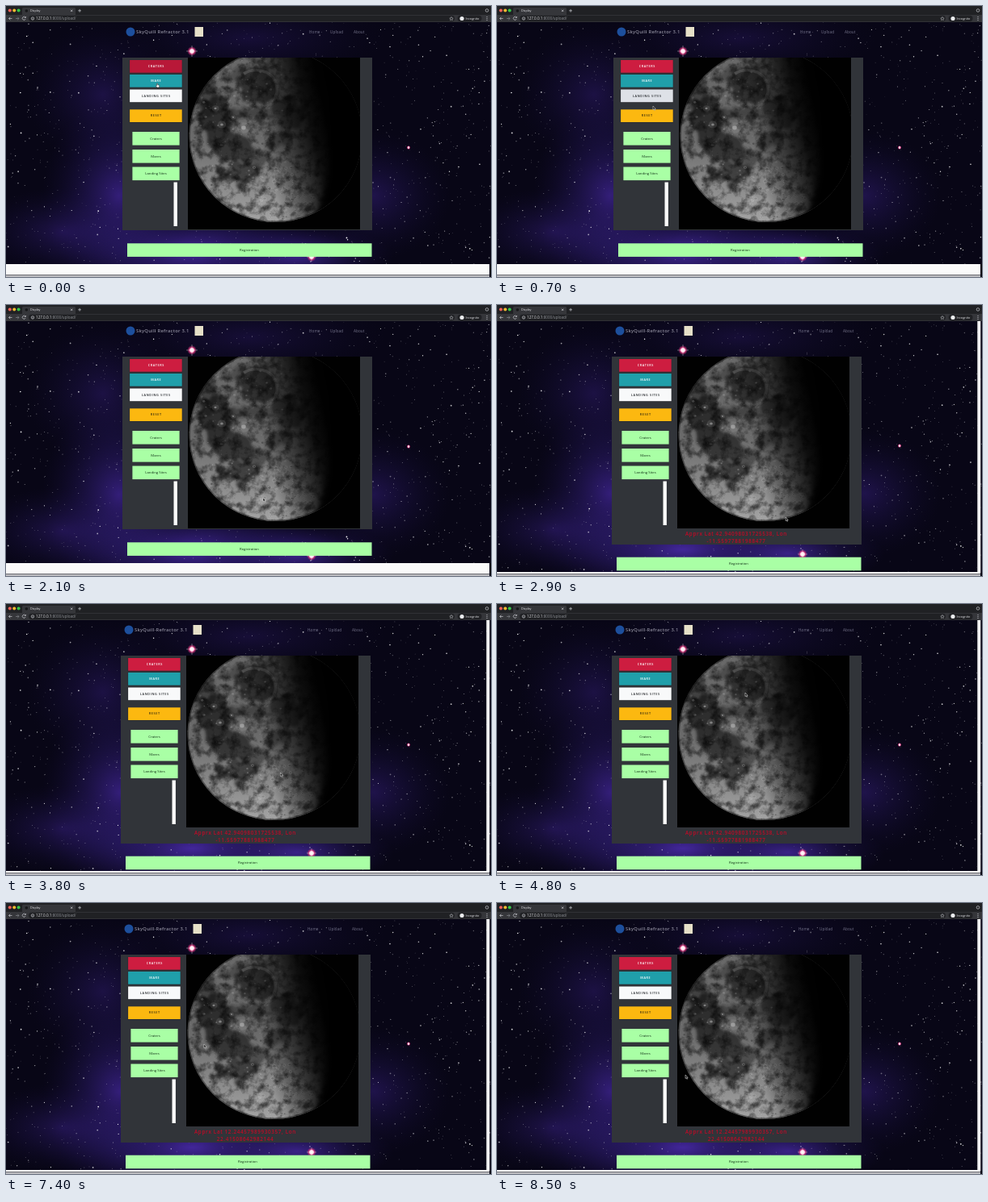
Recreate the animation shown at these times as an HTML page. Size 600 by 336 pixels, loop 8.6 s.

```html
<!DOCTYPE html>
<html lang="en">
<head>
<meta charset="utf-8">
<title>Display</title>
<style>
  html, body { margin: 0; width: 100%; height: 100%; overflow: hidden; background: #0a0720; }
  svg { display: block; width: 100%; height: 100%; }
  text { font-family: "Open Sans", "Noto Sans", sans-serif; }
  .mid { text-anchor: middle; }
  .btn { font-size: 3.8px; font-weight: 600; letter-spacing: .62px; }
  .link { font-size: 4.3px; fill: #123018; }
  .nav { font-size: 4.7px; fill: #74738a; letter-spacing: .05px; }
  .brand { font-size: 5.8px; font-weight: 600; letter-spacing: .25px; fill: #8d8c9c; }
  .ui { font-size: 4.3px; fill: #e4e5e8; }
  .coords { font-size: 6.3px; font-weight: 600; letter-spacing: .66px; fill: #c00a26; }
</style>
</head>
<body>
<svg viewBox="0 0 600 336" preserveAspectRatio="none">
  <defs>
    <radialGradient id="violet">
      <stop offset="0" stop-color="#4c2cb0" stop-opacity=".85"/>
      <stop offset=".5" stop-color="#33207c" stop-opacity=".45"/>
      <stop offset="1" stop-color="#1b1048" stop-opacity="0"/>
    </radialGradient>
    <radialGradient id="pink">
      <stop offset="0" stop-color="#fff"/>
      <stop offset=".4" stop-color="#ffd8ea"/>
      <stop offset=".6" stop-color="#e0357c" stop-opacity=".8"/>
      <stop offset="1" stop-color="#a0206a" stop-opacity="0"/>
    </radialGradient>
    <linearGradient id="ground" x2="0" y2="1">
      <stop offset="0" stop-color="#686868"/>
      <stop offset=".5" stop-color="#6a6a6a"/>
      <stop offset=".75" stop-color="#868686"/>
      <stop offset="1" stop-color="#a4a4a4"/>
    </linearGradient>
    <linearGradient id="night" gradientUnits="userSpaceOnUse" x1="318" y1="165" x2="398" y2="147">
      <stop offset="0" stop-color="#010101" stop-opacity="0"/>
      <stop offset=".4" stop-color="#010101" stop-opacity=".5"/>
      <stop offset=".75" stop-color="#010101" stop-opacity=".88"/>
      <stop offset="1" stop-color="#010101"/>
    </linearGradient>
    <filter id="soft" x="-30%" y="-30%" width="160%" height="160%"><feGaussianBlur stdDeviation="4"/></filter>
    <filter id="ragged" x="-20%" y="-20%" width="140%" height="140%">
      <feTurbulence type="fractalNoise" baseFrequency=".06" numOctaves="4" seed="5"/>
      <feDisplacementMap in="SourceGraphic" scale="26" xChannelSelector="R" yChannelSelector="G"/>
      <feGaussianBlur stdDeviation="1.6"/>
    </filter>
    <filter id="rough" x="0" y="0" width="100%" height="100%">
      <feTurbulence type="fractalNoise" baseFrequency=".09" numOctaves="5" seed="11"/>
      <feColorMatrix values="0 0 0 0 0  0 0 0 0 0  0 0 0 0 0  2.6 0 0 0 -1.1"/>
    </filter>
    <clipPath id="frame"><rect x="225" y="64" width="213" height="213"/></clipPath>
    <clipPath id="disc"><circle cx="333.5" cy="161" r="107"/></clipPath>
  </defs>

  <rect width="600" height="336" fill="#080616"/>
  <g id="sky">
    <g fill="url(#violet)">
      <ellipse cx="230" cy="305" rx="190" ry="60"/>
      <ellipse cx="360" cy="310" rx="120" ry="40" opacity=".8"/>
      <ellipse cx="140" cy="235" rx="95" ry="120" opacity=".75"/>
      <ellipse cx="70" cy="280" rx="110" ry="55" opacity=".4"/>
      <ellipse cx="120" cy="110" rx="95" ry="90" opacity=".35"/>
      <ellipse cx="455" cy="235" rx="95" ry="80" opacity=".4"/>
      <ellipse cx="300" cy="40" rx="170" ry="50" opacity=".25"/>
    </g>
    <g id="stars" fill="#fff"></g>
    <g id="flares" fill="url(#pink)"></g>
  </g>

  <g id="page">
    <circle cx="154" cy="32" r="5.5" fill="#1d4f9c"/>
    <text class="brand" x="161" y="34">SkyQuill Refractor 3.1</text>
    <rect x="233.5" y="26" width="10.5" height="12" fill="#e6e0c8"/>
    <text class="nav" x="375" y="34">Home</text>
    <text class="nav" x="401" y="34">Upload</text>
    <text class="nav" x="430" y="34">About</text>
    <rect id="panel" x="144" y="64" width="309" height="214" fill="#313439"/>
    <g id="buttons"></g>
    <rect x="207.5" y="218.5" width="4.4" height="54.5" fill="#fafafa"/>
    <g clip-path="url(#frame)">
      <rect x="225" y="64" width="213" height="213" fill="#010101"/>
      <g clip-path="url(#disc)">
        <rect x="225" y="54" width="213" height="215" fill="url(#ground)"/>
        <g id="maria" filter="url(#ragged)" fill="#1c1c1c"></g>
        <g id="grain"></g>
        <rect x="225" y="54" width="213" height="215" filter="url(#rough)" opacity=".6"/>
        <g id="rays" fill="#c4c4c4"></g>
        <circle cx="333.5" cy="161" r="107" fill="none" stroke="#010101" stroke-width="3" opacity=".4"/>
        <rect x="225" y="54" width="213" height="225" fill="url(#night)"/>
        <path d="M384 50C398 90 402 130 402 165C402 205 392 245 374 282H450V50Z" fill="#010101" filter="url(#soft)"/>
      </g>
    </g>
    <g id="result" class="mid">
      <text class="coords" x="298" y="286"></text>
      <text class="coords" x="298" y="295"></text>
    </g>
    <g id="register">
      <rect x="150" y="294.3" width="302.5" height="16.6" fill="#a9ffa5"/>
      <text class="link mid" x="301" y="304">Registration</text>
    </g>
  </g>

  <rect id="footer" y="320" width="598" height="16" fill="#fafafa"/>
  <rect y="333" width="598" height="1.2" fill="#6a6a70"/>
  <rect y="334.2" width="598" height="1.8" fill="#b9b9be"/>
  <rect id="scroll" x="594.3" y="20" width="4" height="312" fill="#f2f2f2"/>

  <g id="chrome">
    <rect width="600" height="11" fill="#202124"/>
    <rect y="11" width="600" height="9" fill="#35363a"/>
    <circle cx="4.8" cy="5.4" r="2" fill="#f45f57"/>
    <circle cx="10.2" cy="5.4" r="2" fill="#f6bc30"/>
    <circle cx="15.6" cy="5.4" r="2" fill="#35c748"/>
    <path d="M20 11V3.5Q20 2 21.5 2H84.5Q86 2 86 3.5V11Z" fill="#35363a"/>
    <circle cx="25.3" cy="6" r="1.8" fill="#17181a"/>
    <text class="ui" x="30" y="7.4" style="font-size:3.7px">Display</text>
    <rect x="28" y="11.8" width="527" height="7.4" rx="3.7" fill="#202124"/>
    <rect x="558.5" y="11.8" width="30" height="7.4" rx="3.7" fill="#202124"/>
    <g fill="none" stroke="#c9cbd0" stroke-width=".7">
      <path d="M80 4.6l2.4 2.4m0-2.4l-2.4 2.4M89.2 5.8h3.8m-1.9-1.9v3.8"/>
      <path d="M7.5 15.5H3.5m1.8-1.8l-1.8 1.8l1.8 1.8"/>
      <path d="M12 15.5h4m-1.8-1.8l1.8 1.8l-1.8 1.8" stroke="#83868c"/>
      <path d="M24 14.2A2 2 0 1 0 24.2 16M24.4 13v1.5h-1.6"/>
      <circle cx="33" cy="15.5" r="1.7"/>
      <path d="M33 15.3v1.2"/>
      <path d="M551 13.4l.7 1.4 1.5.2-1.1 1.1.3 1.5-1.4-.7-1.4.7.3-1.5-1.1-1.1 1.5-.2z" stroke-width=".5"/>
      <circle cx="595" cy="5.5" r="1.8"/>
    </g>
    <text class="ui" x="37" y="17" style="font-size:4.6px">127.0.0.1<tspan fill="#8f9298">:8000/upload/</tspan></text>
    <circle cx="564" cy="15.5" r="2.6" fill="#eceef0"/>
    <text class="ui" x="568.5" y="17" style="font-size:3.9px">Incognito</text>
    <g fill="#d3d5d9">
      <circle cx="595" cy="13.5" r=".55"/><circle cx="595" cy="15.5" r=".55"/><circle cx="595" cy="17.5" r=".55"/>
    </g>
  </g>

  <g id="cursor" stroke="#e8e8e8" stroke-width=".5" fill="#111">
    <path id="arrow" d="M0-2V2.6L1.1 1.7L1.9 3.4L2.7 3L1.9 1.4H3.2Z"/>
    <path id="hand" d="M-.4-2Q.3-2.6.7-1.9V-.2L2.5.2Q3 .5 2.7 1.6L2.2 3H-.2L-1.7.9Q-1.4.1-.4.8Z" fill="#fff" stroke="#222"/>
  </g>
</svg>
<script>
const LOOP = 8600, STEP = 100, CLICK = 2600;
const $ = id => document.getElementById(id);
const clamp = v => Math.max(0, Math.min(1, v));
const ease = v => v * v * (3 - 2 * v);
const mix = (a, b, k) => a + (b - a) * k;
const blend = (a, b, k) => `rgb(${a.map((v, i) => Math.round(mix(v, b[i], k)))})`;

function random(seed) {
  return () => (seed = (seed * 16807) % 2147483647) / 2147483647;
}
const oval = (x, y, rx, ry, extra = '') =>
  `<ellipse cx="${x}" cy="${y}" rx="${rx}" ry="${ry}" ${extra}/>`;

function drawSky() {
  const rnd = random(4217);
  let out = '';
  for (let i = 0; i < 1300; i++) {
    const r = .32 + .6 * rnd() ** 4;
    out += oval(rnd() * 600, 20 + rnd() * 318, r, r, `opacity="${.3 + .7 * rnd()}"`);
  }
  $('stars').innerHTML = out;
  const flares = [[230, 56, 6], [378, 311, 6], [498, 175.5, 2.6]];
  $('flares').innerHTML = flares.map(([x, y, r]) => oval(x, y, r, r)).join('') +
    '<path d="M230 49v14m-7-7h14M378 305v12m-6-6h12" stroke="#fff" stroke-width=".5" opacity=".7"/>';
}

function drawMoon() {
  const seas = [
    [311, 99, 25, 23, .72], [261, 143, 19, 32, .75], [281, 176, 25, 19, .7],
    [249, 117, 11, 22, .55], [294, 206, 21, 13, .65], [267, 208, 10, 10, .8],
    [233, 174, 3, 6, .9], [302, 134, 30, 8, .45], [350, 130, 18, 24, .5],
    [338, 168, 14, 12, .4], [284, 83, 17, 6, .35], [312, 190, 14, 12, .45]
  ];
  $('maria').innerHTML = seas.map(([x, y, rx, ry, o]) => oval(x, y, rx, ry, `opacity="${o}"`)).join('');

  const rnd = random(90210);
  let out = '<path d="M294 84Q306 76 322 82Q338 91 335 108Q331 124 318 130" fill="none" stroke="#aaa" stroke-width="3.5" opacity=".25"/>';
  for (let i = 0; i < 500; i++) {
    const x = 226 + rnd() * 170, y = 62 + rnd() * 206, r = .4 + rnd() ** 3 * 1.4;
    const tone = rnd() < .5 ? '#c4c4c4' : '#181818';
    out += oval(x, y, r, r * .8, `fill="${tone}" opacity="${.1 + rnd() * .25}"`);
  }
  for (let i = 0; i < 90; i++) {
    const r = .7 + rnd() * 1.5;
    out += oval(300 + rnd() * 85, 200 + rnd() * 62, r, r * .8,
      'fill="#444" fill-opacity=".4" stroke="#d0d0d0" stroke-width=".5" opacity=".6"');
  }
  $('grain').innerHTML = out;

  const bright = [[294, 151, 4], [267, 147, 2.6], [259, 127, 2.2], [316, 241, 3.4], [281, 138, 1.5]];
  $('rays').innerHTML = bright.map(([x, y, r]) =>
    oval(x, y, r * 2, r * 1.7, 'opacity=".15"') + oval(x, y, r * .7, r * .6, 'opacity=".5"')).join('');
}

function drawButtons() {
  const main = [
    ['craters', 'CRATERS', 67, '#cd1d40', '#fff'], ['mare', 'MARE', 85, '#209faa', '#fff'],
    ['landing', 'LANDING SITES', 103.5, '#f8f9fa', '#25282c'], ['reset', 'RESET', 128.3, '#fcb810', '#3b3010']
  ];
  const links = [['Craters', 156], ['Mares', 178], ['Landing Sites', 199.5]];
  $('buttons').innerHTML = main.map(([id, label, y, fill, ink]) =>
    `<rect x="152.6" y="${y - .2}" width="65.6" height="16.6" fill="#17191c" opacity=".3"/>
     <rect id="${id}" x="153.1" y="${y}" width="64.6" height="15.7" fill="${fill}"/>
     <text class="btn mid" x="185.8" y="${y + 9.1}" fill="${ink}">${label}</text>`).join('') +
    links.map(([label, y]) =>
      `<rect x="156.4" y="${y}" width="58.2" height="16.6" fill="#a9ffa5"/>
       <text class="link mid" x="185.5" y="${y + 9.9}">${label}</text>`).join('');
}

// time, x, y
const path = [
  [0, 187, 98], [700, 193, 126], [1000, 195, 131], [2100, 318, 241], [2500, 357, 265],
  [3400, 357, 265], [4400, 307, 112], [5000, 307, 112], [6000, 253, 151],
  [6700, 253, 151], [8300, 233, 215], [LOOP, 233, 215]
];
const readings = [
  [CLICK, 'Apprx Lat 42.94098031725538, Lon', '-11.55977881988477'],
  [5000, 'Apprx Lat 31.40151307840567, Lon', '-13.12366470847958'],
  [6700, 'Apprx Lat 12.24457989930357, Lon', '22.41508642982144']
];

function pointer(t) {
  const i = path.findIndex(p => p[0] > t);
  const [t0, x0, y0] = path[i - 1], [t1, x1, y1] = path[i];
  const k = ease((t - t0) / (t1 - t0));
  return [mix(x0, x1, k), mix(y0, y1, k)];
}
const pulse = (t, a, b, c, d) => clamp((t - a) / (b - a)) * clamp((d - t) / (d - c));

function render(t) {
  const placed = t >= CLICK;
  $('page').setAttribute('transform', `translate(${placed ? -2 : 0} 0)`);
  $('sky').setAttribute('transform', placed ? 'translate(0 .45) scale(1 .992)' : '');
  $('panel').setAttribute('height', placed ? 233 : 214);
  $('register').setAttribute('transform', `translate(0 ${placed ? 18.4 : 0})`);
  $('footer').setAttribute('y', placed ? 331 : 320);
  $('scroll').style.display = $('result').style.display = placed ? '' : 'none';

  const shown = readings.filter(r => r[0] <= t).pop();
  if (shown) [...$('result').children].forEach((line, i) => line.textContent = shown[i + 1]);

  $('craters').setAttribute('fill', blend([205, 29, 64], [184, 24, 56], clamp(1 - t / 300)));
  $('landing').setAttribute('fill', blend([248, 249, 250], [222, 225, 231], pulse(t, 150, 400, 700, 1000)));
  $('reset').setAttribute('fill', blend([252, 184, 16], [224, 168, 0], pulse(t, 800, 1000, 1200, 1400)));

  const [x, y] = pointer(t);
  const over = x < 218 && (y < 101 || (y > 103.5 && y < 119.3) || (y > 128 && y < 144));
  $('cursor').setAttribute('transform', `translate(${x} ${y})`);
  $('hand').style.display = over ? '' : 'none';
  $('arrow').style.display = over ? 'none' : '';
}

drawSky();
drawMoon();
drawButtons();
const start = performance.now();
let last = -1;
function tick() {
  const t = Math.floor(((performance.now() - start) % LOOP) / STEP) * STEP;
  if (t !== last) render(last = t);
  requestAnimationFrame(tick);
}
tick();
</script>
</body>
</html>
```
